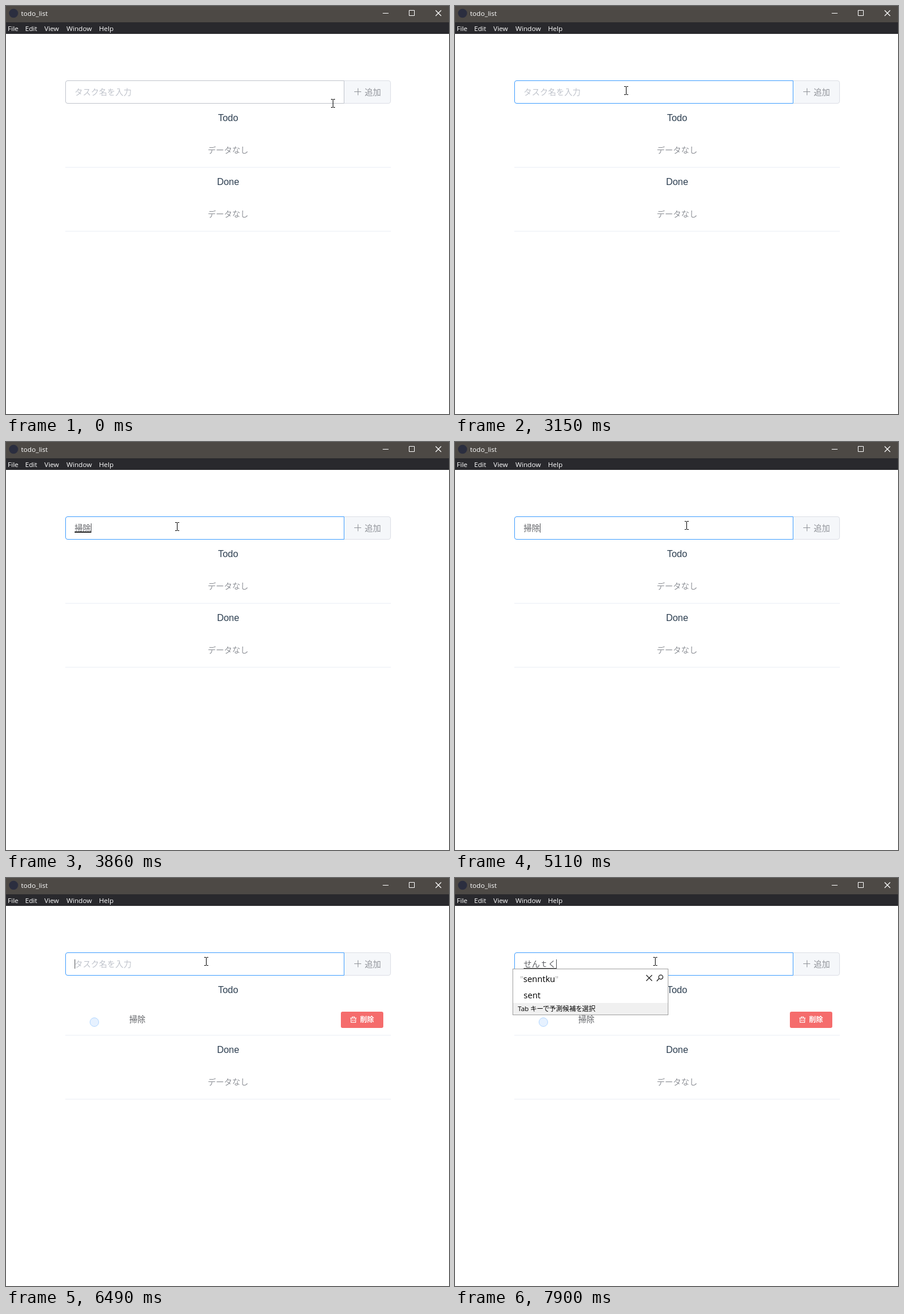
Write an HTML page that moves like this. It is 762 px wide and 702 px high and loops after 8000 ms.

```html
<!DOCTYPE html>
<html lang="ja">
<head>
<meta charset="utf-8">
<title>todo_list</title>
<style>
  html, body { margin: 0; width: 100%; height: 100%; overflow: hidden; background: #fff; }
  svg { display: block; width: 762px; height: 702px; }
  text { font: 14px "Noto Sans CJK JP", "Noto Sans CJK", sans-serif; }
  rect { shape-rendering: crispEdges; }
  .bar text { font: 11.6px "Open Sans", "Noto Sans", sans-serif; fill: #fff; }
  .head { font: 16px "Liberation Sans", Arial, sans-serif; fill: #2c3e50; text-anchor: middle; }
  .empty { fill: #909399; text-anchor: middle; }
  .line { fill: #ebeef5; }
  .hint { fill: #c0c4cc; }
  .typed { fill: #606266; }
  .row { font: 14.6px "Open Sans", "Noto Sans CJK JP", "Noto Sans CJK", sans-serif; fill: #000; }
  .note { font: 11.5px "Open Sans", "Noto Sans CJK JP", "Noto Sans CJK", sans-serif; font-feature-settings: "palt"; fill: #000; }
  .quote { fill: #aaa; }
</style>
</head>
<body>
<svg viewBox="0 0 762 702">
  <g class="bar">
    <rect width="762" height="28" fill="#4d4945"/>
    <rect y="28" width="762" height="20" fill="#29292d"/>
    <circle cx="13" cy="12.5" r="7.8" fill="#2b2e3f"/>
    <text x="26" y="17">todo_list</text>
    <text x="3" y="43">File</text>
    <text x="33" y="43">Edit</text>
    <text x="66" y="43">View</text>
    <text x="104" y="43">Window</text>
    <text x="160" y="43">Help</text>
    <g fill="none" stroke="#fff">
      <path d="M648 12.5h10M693.5 7.5h9v9h-9z"/>
      <path d="M739 7.5l9.5 9.5M748.5 7.5L739 17" stroke-width="1.2"/>
    </g>
  </g>

  <path d="M581.5 128.5H658a3.5 3.5 0 0 1 3.5 3.5V164a3.5 3.5 0 0 1-3.5 3.5H581.5z" fill="#f5f7fa" stroke="#dcdfe6"/>
  <path d="M599 147.5h12M605.5 141.5v12" stroke="#909399" fill="none"/>
  <text x="617" y="153" fill="#909399">追加</text>
  <path id="field" d="M581.5 128.5H106a3.5 3.5 0 0 0-3.5 3.5V164a3.5 3.5 0 0 0 3.5 3.5H581.5z" fill="#fff"/>
  <text id="hint" class="hint" x="118" y="153">タスク名を入力</text>
  <text id="typed" class="typed" x="118" y="153"></text>
  <rect id="under" x="118" fill="#222"/>
  <rect id="caret" y="140" width="1" height="16" fill="#505256"/>

  <text class="head" x="382" y="198">Todo</text>
  <text id="none" class="empty" x="382" y="253">データなし</text>
  <g id="task">
    <circle cx="152" cy="248" r="7.5" fill="#e6f1ff" stroke="#b3d8ff"/>
    <text class="typed" x="212" y="248">掃除</text>
    <rect x="576" y="230" width="73" height="28" rx="3" fill="#f56c6c" style="shape-rendering:auto"/>
    <path d="M592 241h11M595.5 241v-2h4v2M593.5 241v7.5h8V241M596 243.5v3M599 243.5v3" fill="none" stroke="#fff" stroke-width="1.1"/>
    <text x="609" y="248.3" fill="#fff" style="font-size:12px;font-weight:700">削除</text>
  </g>
  <g id="lower">
    <rect class="line" x="102" y="277" width="560" height="1"/>
    <text class="head" x="382" y="308">Done</text>
    <text class="empty" x="382" y="363">データなし</text>
    <rect class="line" x="102" y="387" width="560" height="1"/>
  </g>

  <g id="popup"></g>

  <circle id="press" r="12" fill="#ffff80"/>
  <g id="cursor">
    <g id="beam">
      <path d="M-3-8h3v1h1v-1h3v1H1V6h3v1H1V6H0v1h-3V6h3V-7h-3z" fill="#000" shape-rendering="crispEdges"/>
    </g>
    <path id="arrow" d="M.5.5V16.5l3.8-3.6 2.4 5.6 2.5-1-2.4-5.6H12z" fill="#fff" stroke="#000"/>
    <path id="hand" d="M-1.5 13V1a1.5 1.5 0 0 1 3 0V8q1.5-1.5 3.5 .5q2-1 3.5 .7q2-.5 2.5 1.3V15q0 3-2 5V22.5H-1q0-2-2-4L-5 14q-1.5-2 0-3q1.5-.5 3.5 2zM5 9v3M8.3 9.7v2.6M1.5 8v4" fill="#fff" stroke="#000" stroke-width="1.1"/>
  </g>
</svg>
<script>
const LOOP = 8000;
const el = Object.fromEntries([...document.querySelectorAll('[id]')].map(n => [n.id, n]));
const show = (node, on) => node.style.display = on ? '' : 'none';
const within = (t, spans) => spans.some(([a, b]) => t >= a && t < b);
const latest = (t, list) => list.filter(k => k.at <= t).pop();

// pointer moves: stepped quadratic curves; "via" is the control point
const home = [562, 168];
const moves = [
  { at: 690, end: 840, n: 3, to: [540, 162] },
  { at: 1010, end: 1470, n: 7, via: [430, 295], to: [308, 135] },
  { at: 1760, end: 1920, n: 3, to: [297, 146] },
  { at: 2000, end: 2001, n: 1, to: [294, 146] },
  { at: 4960, end: 5420, n: 7, via: [480, 140], to: [641, 153] },
  { at: 5800, end: 6190, n: 6, via: [500, 225], to: [344, 144] }
];
moves.forEach((m, i) => m.from = i ? moves[i - 1].to : home);

function pointer(t) {
  const m = latest(t, moves);
  if (!m) return home;
  const gap = (m.end - m.at) / Math.max(1, m.n - 1);
  const p = Math.min(1, (Math.floor((t - m.at) / gap + 1e-6) + 1) / m.n);
  return [0, 1].map(k => {
    const a = m.from[k], b = m.to[k], c = m.via ? m.via[k] : (a + b) / 2;
    return Math.round((1 - p) * (1 - p) * a + 2 * p * (1 - p) * c + p * p * b);
  });
}

// input contents; "line" is the thickness of the composition underline
const edits = [
  { at: 0, text: '' },
  { at: 2610, text: 's' }, { at: 2760, text: 'so' }, { at: 2840, text: 's' }, { at: 2920, text: '' },
  { at: 3390, text: 'ｓ', line: 1 }, { at: 3470, text: 'そ', line: 1 }, { at: 3550, text: 'そう', line: 1 },
  { at: 3625, text: 'そうｊ', line: 1 }, { at: 3703, text: 'そうじ', line: 1 }, { at: 3782, text: '掃除', line: 2 },
  { at: 4020, text: '掃除' }, { at: 5700, text: '' },
  { at: 6900, text: 'ｓ', line: 1 }, { at: 6965, text: 'せ', line: 1 }, { at: 7350, text: 'せｎ', line: 1 },
  { at: 7500, text: 'せんｔ', line: 1 }, { at: 7580, text: 'せんｔｋ', line: 1 }, { at: 7750, text: 'せんｔく', line: 1 }
];
const carets = [[1870, 2380], [2610, 3150], [3390, 4550], [5080, 5610], [6280, LOOP]];
const presses = [[1840, 2000], [5570, 5690], [6260, 6420]];

const popups = [
  { at: 0 },
  { at: 3470, rows: ['それ', 'そう', 'その', 'そして', 'そこで', 'それから'] },
  { at: 3625, rows: ['掃除', '操縦', '相談', 'そして', 'そこで', 'それから'] },
  { at: 3782 },
  { at: 6965, rows: ['設定', '説明', '先生', '全部', '世界', '選択'] },
  { at: 7500, rows: ['洗濯', '選択', '先頭', '全部', '世界', '選択'] },
  { at: 7825, rows: ['senntku', 'sent'], quoted: true }
];

function popupMarkup({ rows, quoted }) {
  if (!rows) return '';
  const x = quoted ? 99 : 105, w = quoted ? 268 : 256, h = rows.length * 28 + 24;
  const right = x + w, foot = 156 + h - 21;
  const items = rows.map((r, i) => {
    const mark = quoted && !i ? '<tspan class="quote">"</tspan>' : '';
    return `<text class="row" x="${118 - (mark ? 6 : 0)}" y="${179 + i * 28}">${mark}${r}${mark}</text>`;
  }).join('');
  return `<rect x="${x}" y="156" width="${w}" height="${h}" fill="#a0a0a0"/>
    <rect x="${x + 1}" y="157" width="${w - 2}" height="${h - 2}" fill="#fff"/>
    <rect x="${x + 1}" y="${foot}" width="${w - 2}" height="20" fill="#f0f0f0"/>${items}
    <text class="note" x="${x + 9}" y="${foot + 14}">Tab キーで予測候補を選択</text>
    <g transform="translate(${right} 172)" fill="none" stroke="#222" stroke-width="1.3">
      <path d="M-38-5l10 10M-28-5l-10 10M-16 1l-4 4.5"/><circle cx="-13" cy="-1.5" r="3.6"/>
    </g>`;
}

// border colour fades over 200 ms
const idle = [220, 223, 230], hover = [192, 196, 204], blue = [64, 158, 255];
const borders = [
  { at: -1000, rgb: hover }, { at: 1870, rgb: blue }, { at: 5620, rgb: idle },
  { at: 6110, rgb: hover }, { at: 6280, rgb: blue }
];
const ease = p => p < .5 ? 4 * p ** 3 : 1 - 4 * (1 - p) ** 3;

function border(t) {
  const i = borders.indexOf(latest(t, borders));
  const to = borders[i].rgb, from = i ? borders[i - 1].rgb : to;
  const p = ease(Math.min(1, (t - borders[i].at) / 200));
  return `rgb(${to.map((v, k) => Math.round(from[k] + (v - from[k]) * p))})`;
}

let lastEdit, lastPopup, width = 0;

function draw(t) {
  const edit = latest(t, edits);
  if (edit !== lastEdit) {
    lastEdit = edit;
    el.typed.textContent = edit.text;
    width = edit.text ? Math.round(el.typed.getComputedTextLength()) : 0;
    const line = edit.line || 0;
    show(el.hint, !edit.text);
    el.under.setAttribute('width', width);
    el.under.setAttribute('y', 156 - line);
    el.under.setAttribute('height', line);
    el.caret.setAttribute('x', 118 + width);
  }
  show(el.caret, within(t, carets));
  el.field.setAttribute('stroke', border(t));

  const popup = latest(t, popups);
  if (popup !== lastPopup) {
    lastPopup = popup;
    el.popup.innerHTML = popupMarkup(popup);
  }

  const added = t >= 5700;
  show(el.task, added);
  show(el.none, !added);
  el.lower.setAttribute('transform', `translate(0 ${added ? -7 : 0})`);

  const [x, y] = pointer(t);
  const onButton = x >= 582 && y < 168, outside = y > 170;
  el.cursor.setAttribute('transform', `translate(${x} ${y})`);
  show(el.hand, onButton);
  show(el.arrow, !onButton && outside);
  show(el.beam, !onButton && !outside);
  show(el.press, within(t, presses));
  el.press.setAttribute('cx', x - 2);
  el.press.setAttribute('cy', y - 1);
}

const start = performance.now();
function tick() {
  draw((performance.now() - start) % LOOP);
  requestAnimationFrame(tick);
}
tick();
</script>
</body>
</html>
```
